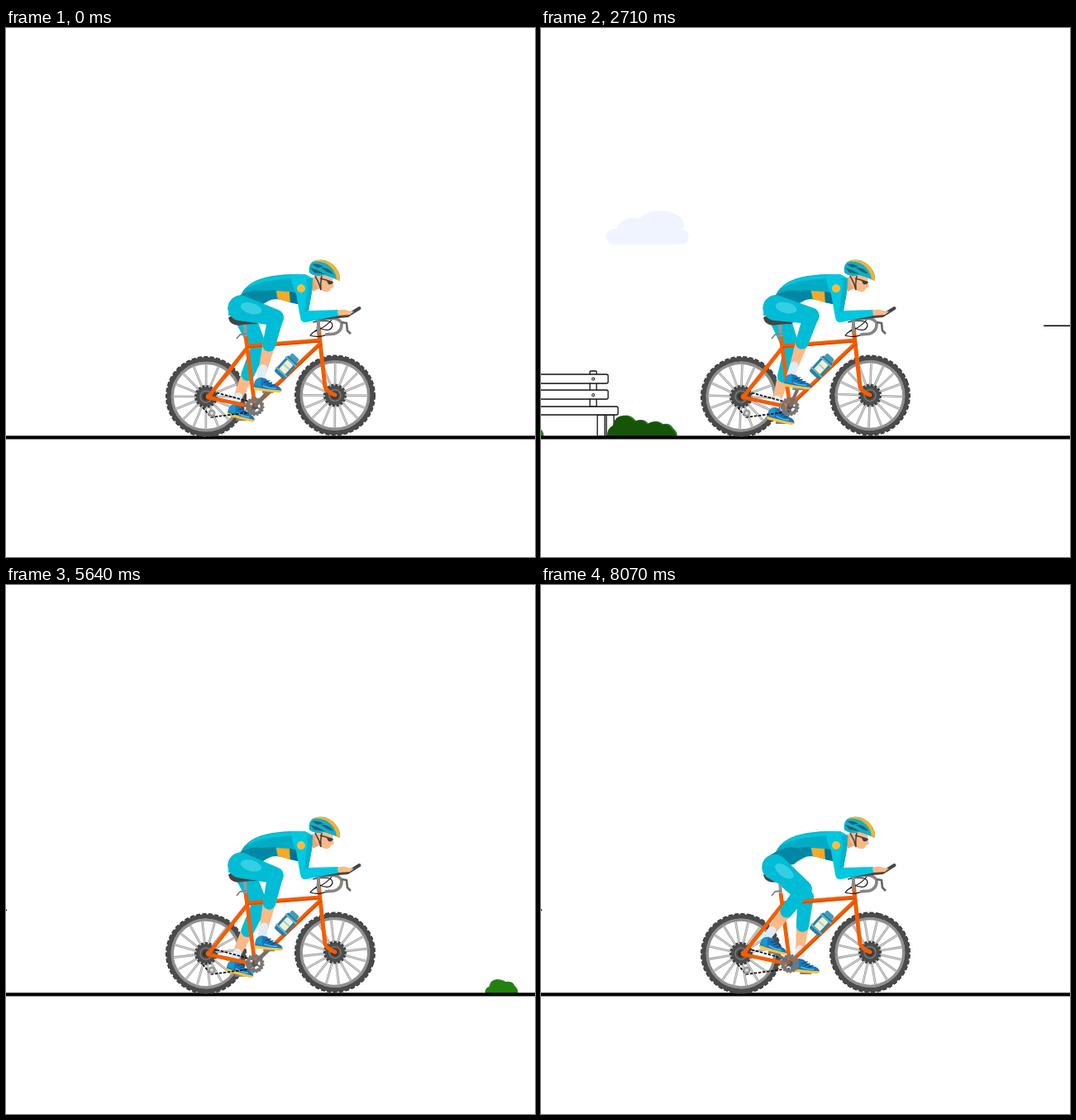
Recreate the animation shown at these times as an HTML page with a canvas. Size 640 px wide and 640 px high, loop 8.14 s.

```html
<!DOCTYPE html>
<html>
<head>
<meta charset="utf-8">
<title>Cyclist</title>
<style>
html, body { margin: 0; width: 100%; height: 100%; overflow: hidden; background: #fff }
canvas { display: block; width: 100vmin; height: 100vmin }
</style>
</head>
<body>
<canvas id="stage" width="640" height="640"></canvas>
<script>
const c = document.getElementById('stage').getContext('2d');
const LOOP = 8140, TURN = 1395, TAU = Math.PI * 2;
const CYAN = '#00bcd4', SKIN = '#fbb987', ORANGE = '#f45d03', DARK = '#454545', GREY = '#858585';

const fill = (d, color) => { c.fillStyle = color; c.fill(new Path2D(d)); };
function line(d, color, width, dash = []) {
  c.strokeStyle = color;
  c.lineWidth = width;
  c.setLineDash(dash);
  c.stroke(new Path2D(d));
  c.setLineDash([]);
}
function oval(x, y, rx, ry, color, turn = 0) {
  c.fillStyle = color;
  c.beginPath();
  c.ellipse(x, y, rx, ry, turn, 0, TAU);
  c.fill();
}
const disc = (x, y, r, color) => oval(x, y, r, r, color);
function ring(r, color, width, dash = []) {
  c.strokeStyle = color;
  c.lineWidth = width;
  c.setLineDash(dash);
  c.beginPath();
  c.arc(0, 0, r, 0, TAU);
  c.stroke();
  c.setLineDash([]);
}
function box(x, y, w, h, r, color, edge) {
  c.beginPath();
  c.roundRect(x, y, w, h, r);
  c.fillStyle = color;
  c.fill();
  if (edge) { c.strokeStyle = edge; c.lineWidth = 1.3; c.stroke(); }
}
function at(x, y, turn, draw) {
  c.save();
  c.translate(x, y);
  c.rotate(turn);
  draw();
  c.restore();
}

// Scenery, drawn from its left edge
function smallCloud() {
  const w = '#f0f4fe';
  disc(40, 16, 16, w);
  disc(21, 22, 13, w);
  box(0, 21, 60, 20, 10, w);
}
function bigCloud() {
  const w = '#f0f4fe';
  oval(66, 17, 28, 17, w);
  oval(33, 24, 20, 15, w);
  box(0, 22, 100, 19, 9.5, w);
}
function bench() {
  const part = (x, y, w, h, r = 1) => box(x, y, w, h, r, '#fff', '#111');
  for (const x of [5, 16, 135, 146]) part(x, 468, 9, 26);
  for (const x of [13, 126]) part(x, 415, 8, 43);
  part(13, 419, 135, 11, 2);
  part(13, 438, 135, 11, 2);
  part(0, 458, 160, 10, 2);
  for (const x of [17, 130]) for (const y of [424.5, 444]) {
    disc(x, y, 2, '#111');
    disc(x, y, 1, '#fff');
  }
}
function darkBush() {
  const d = 'M0 494Q0 484 7 481Q9 469 19 469.5Q27 468 33 476Q43 472 48 479.5Q58 473 66 480Q74 478 78 485Q83 489 83 494Z';
  at(2, -.7, 0, () => fill(d, '#24801a'));
  fill(d, '#165509');
}
const lightBush = () =>
  fill('M0 494Q0 487 5 486Q6 478 14 477Q21 477 25 480Q34 479 36 485Q40 488 40 494Z', '#23820f');

// what, left edge, time at that edge, px per ms, y
const scenery = [
  [smallCloud, 280, 1500, .34, 157], [smallCloud, 163, 1500, .34, 251],
  [bigCloud, 442, 1500, .3, 221], [bench, 397, 1500, .383, 0],
  [lightBush, 443, 1500, .396, 0], [darkBush, 528, 1500, .37, 0],
  [lightBush, 77, 4570, .514, 0], [darkBush, 162, 4570, .514, 0], [darkBush, 324, 4570, .514, 0],
  [lightBush, 580, 5640, .514, 0], [darkBush, 74, 6930, .514, 0]
];

// Gusts of wind: first line's left edge, time at that edge, height offset, rest position
const gusts = [[640, 40, 61, -99], [429, 1500, -47, -99], [609, 2710, 0, -55], [-11, 6930, 0, -55]];
const gustLines = [[0, 360], [97, 308], [248, 256], [362, 303], [446, 393]];

function background(t) {
  for (const [draw, x, t0, speed, y] of scenery) at(x - speed * (t - t0), y, 0, draw);
  for (const [x0, t0, dy, rest] of gusts) for (const [dx, y] of gustLines) {
    const end = y == 393 ? rest : -99;
    const x = Math.max(end, x0 + dx - .82 * (t - t0));
    line(`M${x} ${y + dy + .3}h56`, '#000', 1.6);
  }
  c.fillStyle = '#000';
  c.fillRect(0, 493.3, 640, 4.2);
}

function wheel(x, y, turn) {
  at(x, y, turn, () => {
    ring(47.8, '#3a3a3a', 2.4, [5, 2.4]);
    ring(44.9, '#4b4b4b', 5.6);
    ring(40.8, '#8f8f8f', 3.4);
    for (let i = 0; i < 16; i++) {
      const a = i * TAU / 16, p = r => `${r * Math.cos(a)} ${r * Math.sin(a)}`;
      line(`M${p(12)}L${p(39.5)}`, '#939393', 2.6);
      line(`M${p(12)}L${p(39.5)}`, '#e4e4e4', 1);
    }
    disc(0, 0, 12, '#4d4d4d');
    ring(12.5, '#404040', 3, [3, 1.9]);
    ring(7, '#777', 1.6);
    disc(0, 0, 4, '#333');
  });
}

// Crank angle in degrees against the phase of one turn
const crankKeys = [[-20.6, -64], [-11.6, -50], [15.5, -42], [27, -31], [99, 70],
  [283, 213], [339.4, 296], [348.4, 310], [375.5, 318]];
function crankAngle(t) {
  const p = t % TURN / TURN * 360;
  const i = crankKeys.findIndex(k => k[0] > p);
  const [p0, a0] = crankKeys[i - 1], [p1, a1] = crankKeys[i];
  return (a0 + (a1 - a0) * (p - p0) / (p1 - p0)) * TAU / 360;
}
const orbit = angle => [301 + 23 * Math.cos(angle), 449 + 23 * Math.sin(angle)];

// Rounded limb from a to b with a radius at each end
function limb(a, ra, b, rb, color) {
  const dx = b[0] - a[0], dy = b[1] - a[1], len = Math.hypot(dx, dy);
  const nx = -dy / len, ny = dx / len;
  const p = (q, r) => `${q[0] + nx * r} ${q[1] + ny * r}`;
  fill(`M${p(a, ra)}L${p(b, rb)}A${rb} ${rb} 0 0 0 ${p(b, -rb)}L${p(a, -ra)}A${ra} ${ra} 0 0 0 ${p(a, ra)}Z`, color);
}
const mix = (a, b, k) => [a[0] + (b[0] - a[0]) * k, a[1] + (b[1] - a[1]) * k];

function crankArm(angle) {
  const [x, y] = orbit(angle);
  line(`M301 458L${x} ${y + 7}`, '#707070', 4);
  box(x - 7, y + 6.5, 14, 3, 1, '#808080');
}

function shoe() {
  fill('M-17 4L-16 -4Q-14 -8 -9 -9L-3 -8Q4 -1 12 0Q17 2 17 6Z', '#1976b8');
  fill('M-17 1L-16 -4Q-13 -8 -9 -9L-8 3Z', '#1b96cf');
  line('M-5 -3L2 -6M-1 -1L5 -4M3 1L9 -2', '#0d4a80', 1.2);
  line('M-6 1Q2 4 10 3', '#58c7e6', 1.4);
  fill('M-17 3Q-3 5 17 5Q17 8 13 8L-14 7Q-17 7 -17 3Z', '#ffc43d');
}

function leg(angle, hip, near) {
  const THIGH = 51, SHIN = 73;
  const [sx, sy] = orbit(angle);
  const ankle = [sx - 8, sy - 11];
  const dx = ankle[0] - hip[0], dy = ankle[1] - hip[1];
  const d = Math.min(Math.hypot(dx, dy), THIGH + SHIN - .1);
  const bend = Math.acos((THIGH ** 2 + d * d - SHIN ** 2) / (2 * THIGH * d));
  const dir = Math.atan2(dy, dx) - bend;
  const knee = [hip[0] + THIGH * Math.cos(dir), hip[1] + THIGH * Math.sin(dir)];
  const cuff = mix(knee, ankle, .47);
  limb(mix(knee, ankle, .4), 8, ankle, 4.5, SKIN);
  limb(mix(knee, ankle, .87), 5, mix(knee, ankle, 1.04), 5, '#dcecf8');
  limb(knee, 9.5, cuff, 7.8, CYAN);
  limb(mix(hip, knee, .14), near ? 15.5 : 13, knee, 10, CYAN);
  if (near) {
    const h = mix(hip, knee, .38);
    oval(h[0] + 3 * Math.sin(dir), h[1] - 3 * Math.cos(dir), 13, 6.5, '#35cfe3', dir);
  }
  at(sx, sy, (8 - 6 * Math.cos(angle)) * TAU / 360, shoe);
}

function bike(angle) {
  // Saddle
  line('M289 356L290 374', '#999', 4);
  line('M279 376L283 371L291 370', GREY, 1.8);
  fill('M269 351Q271 346 284 350L305 354Q306 359 298 358L286 359Q272 362 269 351Z', DARK);
  // Chain and derailleur
  line('M250 440L298 453M238 459L248 471L301 464', '#111', 1.7, [3.5, 1.6]);
  disc(249, 466, 4.5, '#999');
  disc(249, 466, 2, '#ddd');
  // Frame
  line('M245 446L291 388M245 447L297 458M290 373L301 457M292 385L380 378M381 381L302 456', ORANGE, 4.8);
  line('M378 361L380 380L386 434Q388 440 398 444', ORANGE, 5);
  line('M292 386.5L380 379.5M382 382L304 456', '#d94b00', 1.4);
  disc(245, 446, 3.4, ORANGE);
  disc(398, 444, 2.6, ORANGE);
  // Bottle
  at(340, 409, .74, () => {
    box(-8, -11, 16, 26, 3, '#2b7f9d');
    box(-5, -6, 10, 15, 1, '#f4efcf');
    line('M-5 1h10', '#8ed3e5', 2);
    box(-6, -16, 12, 6, 2, '#3c9dbd');
    line('M-9 -7h18M-9 10h18', '#67b5cf', 2);
  });
  // Chainring
  at(301, 458, angle, () => {
    ring(8.6, '#777', 4);
    ring(10.7, '#777', 1.8, [2.2, 2]);
    for (let i = 0; i < 5; i++) {
      const a = i * TAU / 5;
      line(`M0 0L${8 * Math.cos(a)} ${8 * Math.sin(a)}`, '#777', 2.4);
    }
    disc(0, 0, 3.6, '#555');
  });
}

function handlebar() {
  line('M371 356Q395 351 395 360Q393 369 379 363Q370 369 368 372Q380 376 391 369M372 368Q387 362 394 353', '#151515', 1.2);
  line('M378 351L378 370', '#8b8b8b', 4);
  line('M380 353Q402 348 406 357Q407 367 397 370L386 371', GREY, 3.6);
  line('M406 356L412 357L413 366L417 370', '#666', 2.6);
  c.lineCap = 'round';
  line('M371 352L402 349L413 348L427.5 339', DARK, 4);
  c.lineCap = 'butt';
}

function torso() {
  fill('M269 348Q270 332 284 323Q292 305 322 300Q342 297 362 298Q371 301 371 313L368 330L353 334L343 332Q334 328 322 328L304 338L285 346Z', '#00acc4');
  fill('M284 323Q298 316 308 318L326 317L328 328Q316 327 306 338L268 340Q272 328 284 323Z', '#0087a3');
  fill('M290 315Q300 301 345 299L346 303Q313 304 290 315Z', '#00c6dd');
  fill('M327 318L343 319L344 332L329 328Z', '#f9a825');
  fill('M343 319L352 320L353 334L344 332Z', '#00738f');
}

function upperBody() {
  fill('M369 302L382 300L381 314L371 319Z', '#eea574');
  fill('M345 299Q362 296 371 303L370 319L366 342L402 341L403 348L363 356Q357 357 356 350L351 322Q345 310 345 299Z', '#00c8e0');
  fill('M363 303Q367 313 363 326L361 344L366 342L370 319L371 303Z', '#00b2cb');
  disc(357, 315, 5, '#fbbd3e');
  fill('M401 342Q409 339 414 342L421 343L416 347L402 348Z', SKIN);
  // Head
  fill('M373 296L396 301L395 307L397 313L393 315Q392 320 386 319Q378 317 374 309Z', SKIN);
  line('M374 300Q379 308 381 317M382 300Q380 309 381 317', '#444', 1.6);
  fill('M387 304L396 307Q395 311 390 310Z', '#414141');
  line('M380 303L388 305', '#414141', 1.5);
  fill('M367 296Q365 284 375 281Q390 278 399 290Q405 297 404 306Q396 302 385 299Q374 302 367 296Z', '#0fb0c8');
  fill('M370 283Q384 277 397 287Q405 297 404 306L400 304Q399 293 389 286Q381 281 370 283Z', '#fbb02d');
  fill('M370 286Q378 284 384 289L377 290ZM381 290Q391 289 396 298L388 295ZM368 290L377 293L386 298L373 296Z', '#28616e');
}

function draw(t) {
  c.fillStyle = '#fff';
  c.fillRect(0, 0, 640, 640);
  c.lineJoin = 'round';
  background(t);
  const angle = crankAngle(t), far = angle + Math.PI, roll = t / TURN * TAU;
  wheel(242, 446, roll);
  wheel(398, 444.5, roll);
  crankArm(far);
  leg(far, [285, 341], false);
  bike(angle);
  handlebar();
  torso();
  upperBody();
  crankArm(angle);
  leg(angle, [277, 337], true);
}

const start = performance.now();
function tick() {
  draw((performance.now() - start) % LOOP);
  requestAnimationFrame(tick);
}
tick();
</script>
</body>
</html>
```
